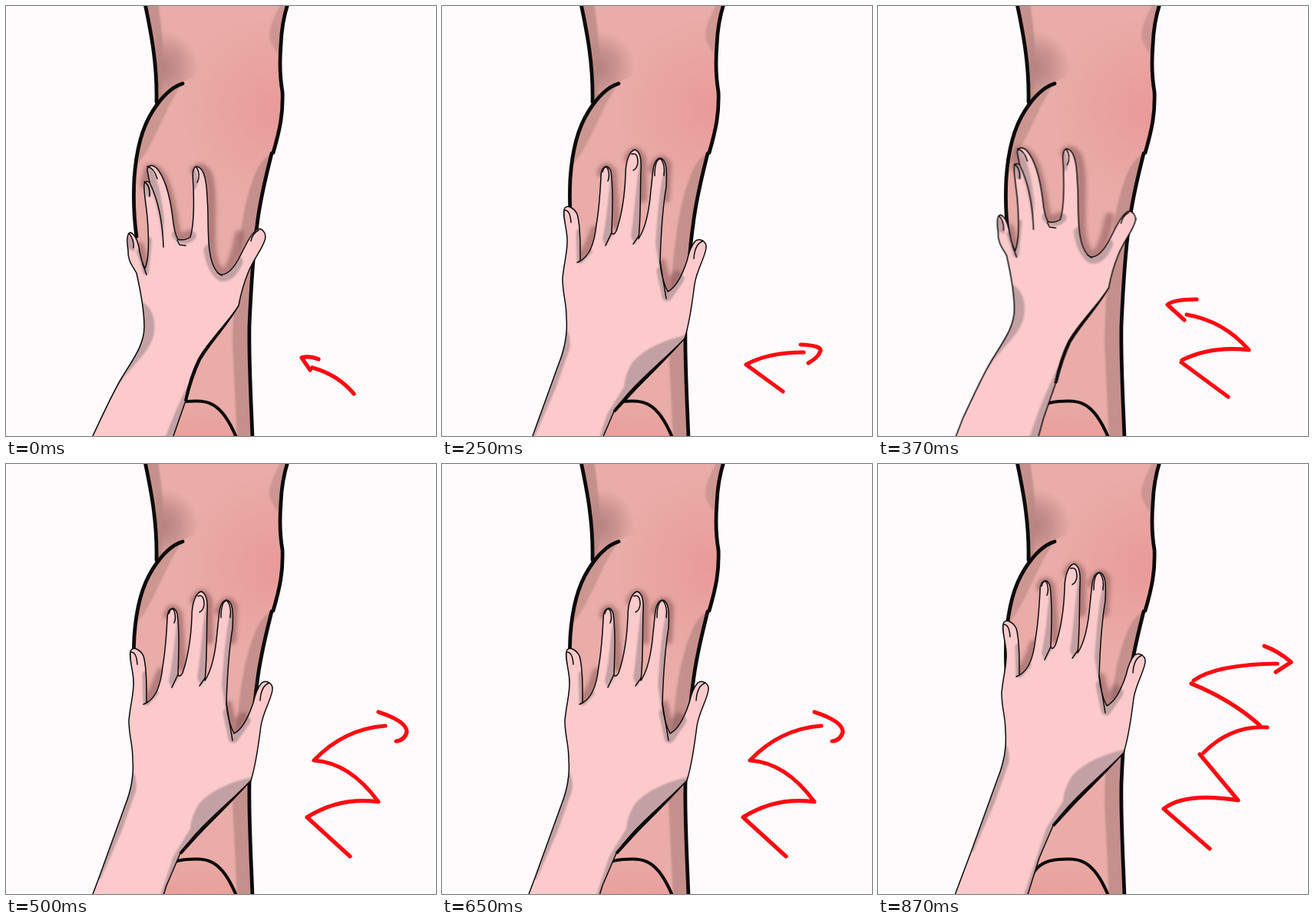
An HTML page that plays this animation: 560x560 px, repeating every 1000 ms.

```html
<!DOCTYPE html>
<html lang="en">
<head>
<meta charset="utf-8">
<title>Leg massage</title>
<style>
html, body { margin: 0; width: 100%; height: 100%; overflow: hidden; background: #fdfbfc; }
svg { display: block; width: 100vw; height: 100vh; }
.ink { fill: none; stroke: #0c0a0a; stroke-linecap: round; stroke-linejoin: round; }
.leg { stroke-width: 4.8; }
.thin { stroke-width: 1.5; }
.taper { fill: #0c0a0a; stroke-width: 1; }
.skin { fill: #fccacb; }
.shade { fill: #c3a0a3; }
.line-shade { fill: none; stroke: #c3a0a3; stroke-linecap: round; stroke-linejoin: round; }
.halo { fill: none; stroke: #80514f; stroke-opacity: .5; stroke-width: 12; stroke-linecap: round; stroke-linejoin: round; }
.arrows path { fill: none; stroke: #fe0a12; stroke-width: 5.2; stroke-linecap: round; stroke-linejoin: round; opacity: 0; }

.hand, .arrows path { animation: 1s step-end infinite; }
.spread { animation-name: spread; }
.flat { animation-name: flat; }
@keyframes spread {
  0% { opacity: 1; transform: translate(0, 0); }
  25% { opacity: 0; }
  37% { opacity: 1; transform: translate(-2.5px, -23px); }
  50% { opacity: 0; }
  75% { opacity: 1; transform: translate(-5px, -66px); }
  87%, 100% { opacity: 0; transform: translate(-5px, -66px); }
}
@keyframes flat {
  0% { opacity: 0; transform: translate(0, 0); }
  25% { opacity: 1; transform: translate(0, 0); }
  37% { opacity: 0; }
  50% { opacity: 1; transform: translate(3px, -21px); }
  75% { opacity: 0; }
  87%, 100% { opacity: 1; transform: translate(4px, -57px); }
}

.arrows path:nth-child(1) { animation-name: step1; }
.arrows path:nth-child(2) { animation-name: step2; }
.arrows path:nth-child(3) { animation-name: step3; }
.arrows path:nth-child(4) { animation-name: step4; }
.arrows path:nth-child(5) { animation-name: step5; }
.arrows path:nth-child(6) { animation-name: step6; }
@keyframes step1 { 0% { opacity: 1; } 25%, 100% { opacity: 0; } }
@keyframes step2 { 0% { opacity: 0; } 25% { opacity: 1; } 37%, 100% { opacity: 0; } }
@keyframes step3 { 0% { opacity: 0; } 37% { opacity: 1; } 50%, 100% { opacity: 0; } }
@keyframes step4 { 0% { opacity: 0; } 50% { opacity: 1; } 75%, 100% { opacity: 0; } }
@keyframes step5 { 0% { opacity: 0; } 75% { opacity: 1; } 87%, 100% { opacity: 0; } }
@keyframes step6 { 0% { opacity: 0; } 87%, 100% { opacity: 1; } }
</style>
</head>
<body>
<svg viewBox="0 0 560 560">
  <defs>
    <radialGradient id="blush" gradientUnits="userSpaceOnUse" cx="350" cy="135" r="125">
      <stop offset="0" stop-color="#e99a98"/>
      <stop offset=".45" stop-color="#e9a3a0"/>
      <stop offset="1" stop-color="#e9aca8"/>
    </radialGradient>
    <linearGradient id="footTone" x1="0" y1="0" x2="0" y2="1">
      <stop offset="0" stop-color="#e9a9a4"/>
      <stop offset="1" stop-color="#e8a09b"/>
    </linearGradient>
    <radialGradient id="hollow" gradientUnits="userSpaceOnUse" cx="203" cy="80" r="48">
      <stop offset="0" stop-color="#a87773" stop-opacity=".8"/>
      <stop offset=".5" stop-color="#a87773" stop-opacity=".5"/>
      <stop offset="1" stop-color="#a87773" stop-opacity="0"/>
    </radialGradient>
    <filter id="soft" x="-50%" y="-50%" width="200%" height="200%"><feGaussianBlur stdDeviation="2.6"/></filter>
    <filter id="edge" x="-20%" y="-20%" width="140%" height="140%"><feGaussianBlur stdDeviation="1"/></filter>
    <filter id="brush" x="-20%" y="-20%" width="140%" height="140%"><feGaussianBlur stdDeviation=".6"/></filter>

    <path id="legShape" d="M181,0 C189,35 197,75 196,125 C178,148 169,185 167,225 C165,265 168,300 174,335 L200,430 L185,560 H322 C319,510 316,460 317,415 C319,370 322,320 327,285 C331,250 339,220 348,190 C357,160 361,140 360,112 C357,95 356,75 358,50 Q360,22 366,0 Z"/>
    <clipPath id="legClip"><use href="#legShape"/></clipPath>

    <path id="spreadShape" d="M82,640 L113,560 C125,535 138,505 152,482 C164,462 180,442 180,418 C180,395 175,370 170,348 C166,340 158,332 159,318 C157,305 157,296 162,295 C168,297 171,305 173,314 C175,325 176,333 181,342 C187,328 186,300 184,275 C182,255 179,240 180,232 Q181,226 187,230 L184,214 C184,207 190,206 196,211 C206,222 213,244 217,275 Q219,296 224,304 Q233,306 240,301 C245,285 245,262 244,235 C243,222 242,210 248,209 C256,210 261,220 262,250 C264,270 262,295 265,318 Q268,342 279,350 C296,351 306,322 314,308 Q321,295 327,291 C334,288 340,297 337,305 C334,316 322,330 315,348 Q307,368 303,390 C290,412 266,436 252,460 Q241,482 234,514 L218,560 L196,640"/>
    <clipPath id="spreadClip"><use href="#spreadShape"/></clipPath>

    <path id="flatShape" d="M88,640 L118,560 L152,466 C160,446 164,428 162,405 C162,385 157,375 157,355 C159,332 164,320 163,302 C162,287 156,270 160,263 C164,259 172,263 176,271 C181,288 180,315 180,332 C193,325 199,305 201,285 C205,262 206,242 207,223 C207,207 217,205 220,216 C223,238 222,265 221,296 Q224,299 227,293 C235,270 238,245 239,220 C239,200 245,189 251,187 C258,189 260,200 259,215 C258,245 259,275 256,303 C266,288 270,265 272,240 C275,215 274,201 284,198 C293,200 293,215 292,235 C287,265 285,300 284,333 Q286,357 294,372 C306,366 314,347 319,332 Q323,314 330,306 C337,301 345,308 344,315 C342,329 332,343 329,362 C326,385 323,411 316,433 C294,457 264,483 244,505 L224,528 L206,570 L184,640"/>
    <clipPath id="flatClip"><use href="#flatShape"/></clipPath>
  </defs>

  <rect width="560" height="560" fill="#fdfbfc"/>

  <use href="#legShape" fill="url(#blush)"/>
  <g clip-path="url(#legClip)">
    <path d="M196,30 H255 V90 Q218,98 196,128 Z" fill="url(#hollow)"/>
    <g fill="#b98783" filter="url(#edge)">
      <path d="M178,-3 H198 C205,40 208,85 201,128 H190 Z" opacity=".75"/>
      <path d="M232,98 C213,122 201,158 182,191 L171,206 L160,180 L195,120 Z" opacity=".6"/>
      <path d="M358,-3 C350,12 342,28 343,42 Q348,55 354,62 L370,0 Z" opacity=".55"/>
      <path d="M352,190 C330,195 322,222 312,258 C301,310 296,380 295,440 L301,565 H330 Z" opacity=".75"/>
    </g>
    <path d="M200,542 C203,525 218,516 235,515 Q262,512 276,519 Q290,530 300,560 H195 Z" fill="url(#footTone)"/>
  </g>
  <g class="ink leg" filter="url(#brush)">
    <path d="M181,-3 C189,35 197,75 196,125"/>
    <path d="M230,101 C214,106 201,121 191,137 C174,163 169,195 167,225 Q165,265 170,300"/>
    <path d="M367,-3 Q359,22 358,50 C356,75 357,95 360,112 C361,140 357,160 348,191"/>
    <path d="M346,192 C339,220 331,250 327,285 C322,320 319,370 317,415 C316,460 319,510 321,563"/>
    <path d="M201,535 C208,521 220,516 235,515 C262,513 280,514 300,562" stroke-width="4.2"/>
  </g>

  <g class="hand spread">
    <g class="halo" filter="url(#soft)">
      <path d="M181,232 L186,212 Q195,209 204,224 C213,242 217,270 222,298 Q232,304 239,297"/>
      <path d="M246,214 Q255,206 263,220 C271,245 265,285 268,320 Q271,342 282,349 Q294,348 304,298"/>
      <path d="M174,313 Q178,328 183,342"/>
    </g>
    <use href="#spreadShape" class="skin"/>
    <g clip-path="url(#spreadClip)">
      <g class="shade" filter="url(#edge)">
        <path d="M174,384 C192,391 196,412 192,430 C186,452 162,470 146,494 L130,494 L155,384 Z"/>
        <path d="M184,207 C195,215 203,243 206,280 L204,305 C200,275 194,249 187,232 Z"/>
        <path d="M179,228 Q189,229 189,248 L183,248 Z"/>
        <path d="M243,209 Q251,214 249,235 L243,242 Z"/>
        <path d="M157,295 L165,305 L168,320 L157,315 Z"/>
        <path d="M237,493 C224,520 214,543 207,564 L180,642 H205 L242,514 Z"/>
      </g>
      <g class="line-shade" filter="url(#edge)">
        <path d="M265,318 Q269,343 281,351 Q292,353 301,333" stroke-width="15"/>
        <path d="M222,298 Q232,309 242,299" stroke-width="12"/>
        <path d="M174,320 Q180,336 182,346 L186,305" stroke-width="8"/>
      </g>
    </g>
    <g class="ink thin">
      <use href="#spreadShape"/>
      <path d="M187,230 C197,250 204,280 205,314"/>
      <path d="M184,209 Q193,211 197,225M180,229 Q188,233 187,248M248,210 Q254,219 249,230"/>
      <path d="M178,336 L183,350M223,305 L226,311 L234,312M275,347 L281,351M319,306 Q321,296 329,292M160,296 Q167,304 166,315"/>
      <path class="taper" d="M303,390 C289,411 264,436 250.500,459 Q239,482 232.500,514 L235.500,514 Q243,483 253.500,461 C268,437 291,413 303,390 Z"/>
    </g>
  </g>

  <g class="hand flat">
    <g class="halo" filter="url(#soft)">
      <path d="M208,217 Q213,204 221,216 L224,255 L226,285"/>
      <path d="M243,199 Q252,181 260,199 L261,250"/>
      <path d="M275,212 Q284,192 293,207 L291,250"/>
      <path d="M199,292 Q190,319 181,327M286,335 L294,369 L306,350"/>
    </g>
    <use href="#flatShape" class="skin"/>
    <g clip-path="url(#flatClip)">
      <g class="shade" filter="url(#edge)">
        <path d="M320,428 C290,435 265,445 248,464 Q238,480 237,496 L215,532 L178,642 H200 L240,545 L330,440 Z"/>
        <path d="M161,418 Q169,432 166,447 L148,498 L120,562 L110,560 L152,440 Z"/>
        <path d="M292,203 C283,235 281,270 278,309 L283,340 H292 L298,220 Z"/>
        <path d="M221,214 C217,240 216,270 209,304 L213,313 L224,296 Z"/>
        <path d="M260,193 C253,220 252,262 246,300 L251,310 L260,295 Z"/>
      </g>
      <g class="line-shade" filter="url(#edge)">
        <path d="M179,295 L180,331 L191,319" stroke-width="9"/>
        <path d="M286,345 L293,378 L309,355" stroke-width="13"/>
      </g>
    </g>
    <g class="ink thin">
      <use href="#flatShape"/>
      <path d="M221,295 L213,312M256,300 L249,310M284,333 L292,381M180,332 L176,334"/>
      <path d="M160,266 Q167,266 168,282M209,216 Q212,206 216,212 Q219,221 216,228M247,193 Q255,190 255,204 Q254,212 249,214M277,221 Q277,199 285,199 Q291,207 289,221M328,329 Q329,310 340,306"/>
      <path class="taper" d="M316,433 C293,456 262,482 242.500,504 L223,527 L225.500,529 L246,506.500 C266,485 295,458 316,433 Z"/>
    </g>
  </g>

  <g class="arrows">
    <path d="M453,505 Q432,480 399,471M407,460 Q394,455 385,458 L396,474"/>
    <path d="M444,502 L396,467 Q425,451 471,451M467,441 Q494,442 493,449 Q490,458 477,465"/>
    <path d="M456,509 L395,464 M396,461 Q435,442 483,448 Q450,410 402,402M415,382 Q385,382 377,389 L399,409"/>
    <path d="M448,511 L392,460 Q435,433 485,440 Q448,389 401,386 Q440,345 494,341M485,323 Q522,335 522,349 Q519,360 508,361"/>
    <path d="M445,516 L390,463 Q376,449 389,441 C407,429 445,427 482,435 Q445,390 410,384 Q440,341 498,347 Q460,305 409,293M425,277 Q398,271 387,279 Q392,289 409,302"/>
    <path d="M432,501 L372,449 Q400,427 469,438 L419,378M424,376 Q460,340 507,343M497,340 Q460,307 408,286M411,282 Q440,261 520,260M503,237 Q522,244 538,258 L518,271"/>
  </g>
</svg>
</body>
</html>
```
